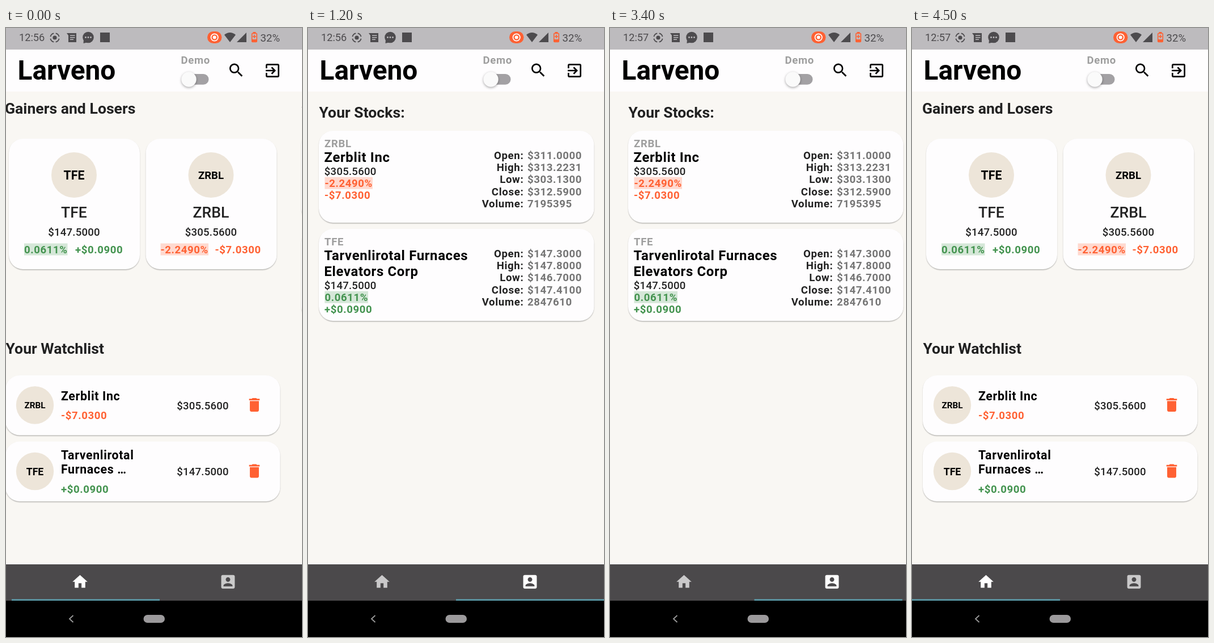
Animation of 522x1073 px, one loop 4.6 s. Source, as an HTML page with a canvas:

```html
<!DOCTYPE html>
<html lang="en">
<head>
<meta charset="utf-8">
<title>Stock tracker</title>
<style>
  html, body { margin: 0; width: 100%; height: 100%; overflow: hidden; background: #000; }
  canvas { display: block; width: 522px; height: 1073px; }
</style>
</head>
<body>
<canvas id="stage"></canvas>
<script>
const W = 522, H = 1073, LOOP = 4600, STEP = 100;
const DP = 1.329; // pixels per density-independent unit
const TOP = 112, NAV = 945, NAV_END = 1009;

const INK = '#212121', GREY = '#9e9e9e', VALUE = '#757575';
const BG = '#f9f7f3', WHITE = '#fefdfe', SAND = '#ede5d9';
const RED = '#ff6133', RED_BG = '#ffd9cf', GREEN = '#43934f', GREEN_BG = '#d5e7d8';
const TEAL = '#5b9aa9', STATUS = '#4d4b4e', STATUS_BG = '#bdbbbe';

const ICONS = {
  home: 'M10 20v-6h4v6h5v-8h3L12 3 2 12h3v8z',
  account: 'M3 5v14c0 1.1.89 2 2 2h14c1.1 0 2-.9 2-2V5c0-1.1-.9-2-2-2H5c-1.11 0-2 .9-2 2zm12 4c0 1.66-1.34 3-3 3s-3-1.34-3-3 1.34-3 3-3 3 1.34 3 3zm-9 8c0-2 4-3.1 6-3.1s6 1.1 6 3.1v1H6v-1z',
  search: 'M15.5 14h-.79l-.28-.27C15.41 12.59 16 11.11 16 9.5 16 5.91 13.09 3 9.5 3S3 5.91 3 9.5 5.91 16 9.5 16c1.61 0 3.09-.59 4.23-1.57l.27.28v.79l5 4.99L20.49 19l-4.99-5zm-6 0C7.01 14 5 11.99 5 9.5S7.01 5 9.5 5 14 7.01 14 9.5 11.99 14 9.5 14z',
  exit: 'M10.09 15.59L11.5 17l5-5-5-5-1.41 1.41L12.67 11H3v2h9.67l-2.58 2.59zM19 3H5c-1.11 0-2 .9-2 2v4h2V5h14v14H5v-4H3v4c0 1.1.89 2 2 2h14c1.1 0 2-.9 2-2V5c0-1.1-.9-2-2-2z',
  trash: 'M6 19c0 1.1.9 2 2 2h8c1.1 0 2-.9 2-2V7H6v12zM19 4h-3.5l-1-1h-5l-1 1H5v2h14V4z'
};
for (const key in ICONS) ICONS[key] = new Path2D(ICONS[key]);

const STOCKS = {
  low: {
    ticker: 'ZRBL', name: ['Zerblit Inc'], short: ['Zerblit Inc'],
    price: '$305.5600', pct: '-2.2490%', diff: '-$7.0300', color: RED, tint: RED_BG, pctWidth: 84.5,
    stats: ['$311.0000', '$313.2231', '$303.1300', '$312.5900', '7195395'],
    bigSize: 18.6, smallSize: 15.3
  },
  high: {
    ticker: 'TFE', name: ['Tarvenlirotal Furnaces', 'Elevators Corp'], short: ['Tarvenlirotal', 'Furnaces …'],
    price: '$147.5000', pct: '0.0611%', diff: '+$0.0900', color: GREEN, tint: GREEN_BG, pctWidth: 76.5,
    stats: ['$147.3000', '$147.8000', '$146.7000', '$147.4100', '2847610'],
    bigSize: 21.3, smallSize: 17.7
  }
};
const LABELS = ['Open:', 'High:', 'Low:', 'Close:', 'Volume:'];

// [time, value] pairs
const SCROLL = [[0, 20], [100, 58], [200, 108], [300, 168], [400, 232], [500, 325], [600, 415],
  [700, 472], [800, 502], [900, 515], [1000, 520], [1100, 522], [3100, 522], [3200, 521],
  [3300, 517], [3400, 509], [3500, 472], [3600, 400], [3700, 303], [3800, 208], [3900, 125],
  [4000, 68], [4100, 34], [4200, 15], [4300, 5], [4400, 1], [4500, 0]];
const GLOW_ALPHA = [[1900, 0], [2200, .04], [2400, .05], [2600, .03], [2800, .012], [3000, 0]];
const GLOW_SIZE = [[1900, .2], [2300, 1], [2600, 1.2], [3000, .9]];

const canvas = document.getElementById('stage');
const ratio = window.devicePixelRatio || 1;
canvas.width = W * ratio;
canvas.height = H * ratio;
const ctx = canvas.getContext('2d');

function track(keys, t) {
  if (t <= keys[0][0]) return keys[0][1];
  for (let i = 1; i < keys.length; i++) {
    const [t1, v1] = keys[i], [t0, v0] = keys[i - 1];
    if (t <= t1) return v0 + (v1 - v0) * (t - t0) / (t1 - t0);
  }
  return keys[keys.length - 1][1];
}

// y is the middle of the capital letters
function text(str, x, y, size, { weight = 500, color = INK, gap = 0, align = 'left' } = {}) {
  ctx.font = `${weight} ${size}px Roboto, sans-serif`;
  ctx.letterSpacing = gap + 'px';
  ctx.textAlign = align;
  ctx.fillStyle = color;
  ctx.fillText(str, x, y + size * .3555);
}

function rect(x, y, w, h, color) {
  ctx.fillStyle = color;
  ctx.fillRect(x, y, w, h);
}

function round(x, y, w, h, r, color) {
  ctx.beginPath();
  ctx.roundRect(x, y, w, h, r);
  ctx.fillStyle = color;
  ctx.fill();
}

function disc(x, y, r, color) {
  ctx.beginPath();
  ctx.arc(x, y, r, 0, Math.PI * 2);
  ctx.fillStyle = color;
  ctx.fill();
}

function poly(points, color) {
  ctx.beginPath();
  points.forEach(([x, y]) => ctx.lineTo(x, y));
  ctx.closePath();
  ctx.fillStyle = color;
  ctx.fill();
}

function shadow(alpha, blur, dy, draw) {
  ctx.save();
  ctx.shadowColor = `rgba(0,0,0,${alpha})`;
  ctx.shadowBlur = blur * ratio;
  ctx.shadowOffsetY = dy * ratio;
  draw();
  ctx.restore();
}

function card(x, y, w, h) {
  shadow(.26, 1.6, 1.4, () => round(x, y, w, h, 25, WHITE));
}

function icon(name, x, y, color) {
  ctx.save();
  ctx.translate(x, y);
  ctx.scale(DP, DP);
  ctx.translate(-12, -12);
  ctx.fillStyle = color;
  ctx.fill(ICONS[name]);
  ctx.restore();
}

function change(stock, x, y) {
  rect(x, y - 10.5, stock.pctWidth, 21, stock.tint);
  text(stock.pct, x, y, 18.6, { weight: 700, color: stock.color, gap: .58 });
}

function diff(stock, x, y) {
  text(stock.diff, x, y, 18.6, { weight: 700, color: stock.color, gap: .58 });
}

function heading(str, x, y) {
  text(str, x, y, 26.6, { weight: 700 });
}

function mover(stock, x, pctX, diffX) {
  const mid = x + 115;
  const center = { align: 'center' };
  card(x, 195, 231, 230);
  disc(mid, 259, 40, SAND);
  text(stock.ticker, mid, 259.5, stock.bigSize, { weight: 700, color: '#000', ...center });
  text(stock.ticker, mid, 325, 26.6, center);
  text(stock.price, mid, 359.5, 18.6, { gap: .22, ...center });
  change(stock, pctX, 390);
  diff(stock, diffX, 390);
}

function watched(stock, y, nameY, diffY) {
  card(19, y, 484.5, 105.5);
  disc(71, y + 52.5, 33.2, SAND);
  text(stock.ticker, 71, y + 53, stock.smallSize, { weight: 700, color: '#000', align: 'center' });
  stock.short.forEach((line, i) =>
    text(line, 117, nameY + i * 25, 21.3, { weight: 700, color: '#000', gap: .66 }));
  diff(stock, 117, diffY);
  text(stock.price, 367, y + 53, 18.6, { gap: .22, align: 'center' });
  icon('trash', 458, y + 52, RED);
}

function homePage() {
  heading('Gainers and Losers', 18, 142);
  mover(STOCKS.high, 25, 52, 142);
  mover(STOCKS.low, 266.5, 292.5, 388.5);
  heading('Your Watchlist', 19.5, 565);
  watched(STOCKS.low, 612, 648.5, 682.5);
  watched(STOCKS.high, 728.5, 752.5, 812);
}

function holding(stock, y) {
  card(19, y, 485.5, 162);
  text(stock.ticker, 29, y + 22, 18.6, { weight: 700, color: GREY, gap: .66 });
  stock.name.forEach((line, i) =>
    text(line, 28.5, y + 46.5 + i * 28, 23.9, { weight: 700, color: '#000', gap: .66 }));
  const below = y + 71 + (stock.name.length - 1) * 28;
  text(stock.price, 28.8, below, 18.6, { gap: .22 });
  change(stock, 29.5, below + 21.2);
  diff(stock, 29, below + 42.5);
  stock.stats.forEach((value, i) => {
    const rowY = y + 43.3 + i * 21.25;
    text(LABELS[i], 380.3, rowY, 18.6, { weight: 700, gap: .66, align: 'right' });
    text(value, 387, rowY, 18.6, { weight: 700, color: VALUE, gap: .58 });
  });
}

function stocksPage() {
  heading('Your Stocks:', 19.5, 148.5);
  holding(STOCKS.low, 181);
  holding(STOCKS.high, 354);
}

function glow(t) {
  const alpha = track(GLOW_ALPHA, t);
  if (!alpha) return;
  const radius = W * 1.5;
  ctx.save();
  ctx.globalAlpha = alpha;
  ctx.translate(0, TOP);
  ctx.scale(1, track(GLOW_SIZE, t));
  disc(W / 2, 105 - radius, radius, TEAL);
  ctx.restore();
}

function pages(t, scroll) {
  ctx.save();
  ctx.beginPath();
  ctx.rect(0, TOP, W, NAV - TOP);
  ctx.clip();
  rect(0, TOP, W, NAV - TOP, BG);
  ctx.translate(-scroll, 0);
  homePage();
  ctx.translate(W, 0);
  stocksPage();
  ctx.translate(scroll - W, 0);
  glow(t);
  ctx.restore();
}

function stroke(color, width) {
  ctx.strokeStyle = color;
  ctx.lineWidth = width;
  ctx.stroke();
}

function statusBar(late) {
  rect(0, 0, W, 38, STATUS_BG);
  text(late ? '12:57' : '12:56', 23, 17, 18.2, { weight: 400, color: STATUS });

  ctx.save();
  if (late) ctx.translate(-1, 0);
  disc(86, 17, 3.6, STATUS);
  for (let i = 0; i < 4; i++) {
    const a = Math.PI * (i / 2 + .07);
    ctx.beginPath();
    ctx.arc(86, 17, 7.8, a, a + Math.PI * .36);
    stroke(STATUS, 1.8);
  }
  poly([[107, 9], [124, 9], [124, 25], [110, 25], [110, 13]], STATUS);
  [12.5, 16, 19.5].forEach((y, i) => rect(113, y, i < 2 ? 8.5 : 6, 1.5, STATUS_BG));
  disc(145, 16.5, 9.8, STATUS);
  poly([[137, 20], [136.5, 27], [145, 25]], STATUS);
  [140.5, 145, 149.5].forEach(x => disc(x, 16.5, 1.4, STATUS_BG));
  rect(166, 8, 17, 17, STATUS);
  ctx.restore();

  round(355, 6, 25.5, 21, 10.5, RED);
  ctx.beginPath();
  ctx.arc(367.7, 16.5, 6.2, 0, Math.PI * 2);
  stroke('#fff', 1.7);
  disc(367.7, 16.5, 3, '#fff');
  ctx.beginPath();
  ctx.moveTo(395, 25);
  ctx.lineTo(385, 12);
  ctx.quadraticCurveTo(395, 4, 405, 12);
  ctx.closePath();
  ctx.fillStyle = STATUS;
  ctx.fill();
  poly([[407, 25], [424, 25], [424, 8]], STATUS);
  rect(435.5, 7, 5, 3, RED);
  ctx.beginPath();
  ctx.roundRect(433.7, 9.5, 8.6, 15, 1);
  stroke(RED, 1.6);
  rect(434, 20, 8, 4.5, RED);
  rect(437.2, 12, 1.6, 6, RED);
  rect(435, 14.2, 6, 1.6, RED);
  text('32%', 448.5, 17, 18.6, { weight: 400, color: STATUS });
}

function appBar() {
  rect(0, 38, W, TOP - 38, WHITE);
  text('Larveno', 20.5, 74.5, 47.8, { weight: 700, color: '#000' });
  text('Demo', 308.5, 56.5, 18.6, { weight: 700, color: GREY, gap: .66 });
  round(313.5, 81, 44, 18.8, 9.4, '#a3a1a4');
  shadow(.35, 4, 1.5, () => disc(322.5, 90.5, 13.2, '#fafafa'));
  icon('search', 406, 74.5, '#000');
  icon('exit', 470, 75, '#000');
}

function navBar(scroll) {
  const part = scroll / W;
  rect(0, NAV, W, NAV_END - NAV, '#4b494b');
  icon('home', 130.5, 975.7, `rgba(255,255,255,${1 - .3 * part})`);
  icon('account', 391.5, 975.7, `rgba(255,255,255,${.7 + .3 * part})`);
  rect(scroll / 2, 1006.3, W / 2, 2.7, TEAL);

  rect(0, NAV_END, W, H - NAV_END, '#000');
  ctx.beginPath();
  ctx.moveTo(118.5, 1035);
  ctx.lineTo(112, 1041);
  ctx.lineTo(118.5, 1047);
  stroke('#9b9b9b', 1.8);
  round(242.5, 1034, 37.5, 14, 7, '#9c9a9c');
}

const start = performance.now();

function draw() {
  const t = Math.floor(((performance.now() - start) % LOOP) / STEP) * STEP;
  const scroll = track(SCROLL, t);
  ctx.setTransform(ratio, 0, 0, ratio, 0, 0);
  pages(t, scroll);
  statusBar(t >= 1600);
  appBar();
  navBar(scroll);
  requestAnimationFrame(draw);
}
draw();
</script>
</body>
</html>
```
